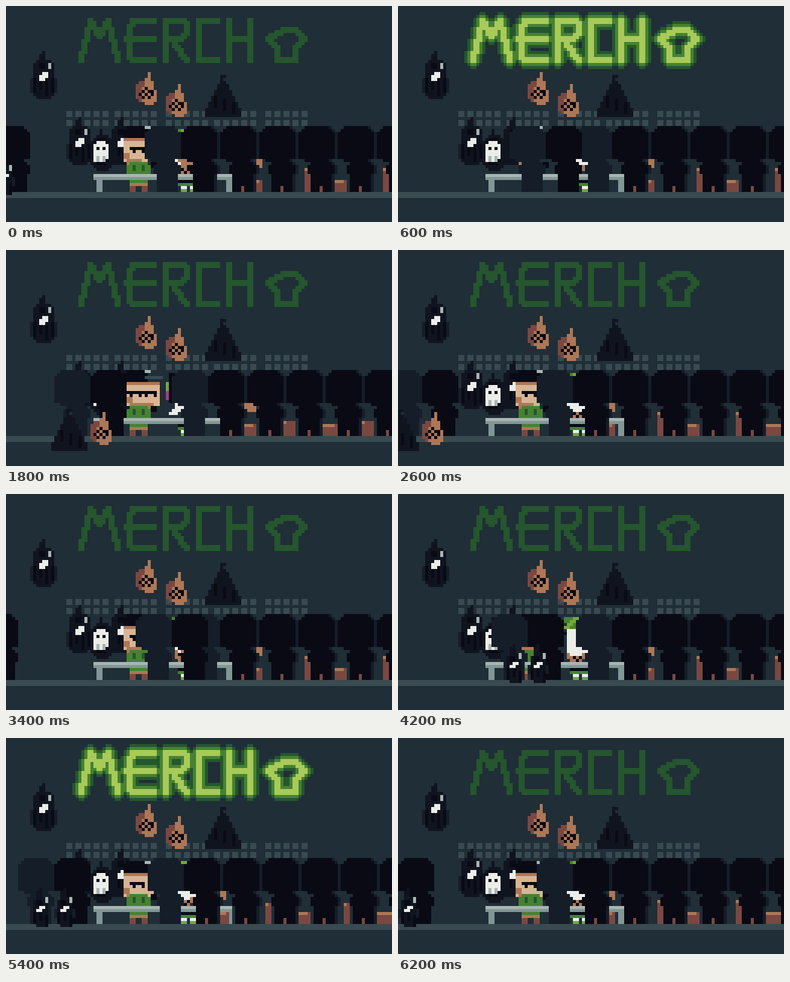
Write an HTML page with a canvas that moves like this. It is 640 px wide and 360 px high and loops after 6.4 s.

```html
<!DOCTYPE html>
<html>
<head>
<meta charset="utf-8">
<style>
html, body { margin: 0; width: 100%; height: 100%; overflow: hidden; background: #202e37; }
canvas { display: block; width: 640px; height: 360px; image-rendering: pixelated; }
</style>
</head>
<body>
<canvas id="stage" width="128" height="72"></canvas>
<script>
const ctx = document.getElementById('stage').getContext('2d');
const WALL = '#202e37', STEEL = '#394a50', SHADE = '#151d28', COAL = '#10141f', INK = '#090a14';
const WHITE = '#ebede9', SILVER = '#a8b5b2', GREY = '#819796', PINK = '#a23e8c';
const SKIN = '#d7b594', TAN = '#ad7757', BROWN = '#7a4841';
const MOSS = '#25562e', GREEN = '#468232', LEAF = '#75a743', LIME = '#a8ca58';
const STEP = 200, CYCLE = 3200, GAP = 13;

const mix = (a, b, k) => a + (b - a) * k;

function box(color, x, y, w, h) {
  ctx.fillStyle = color;
  ctx.fillRect(Math.round(x), Math.round(y), Math.round(w), Math.round(h));
}

// Stack of pixel rows; edges(i) gives the left and right end of row i.
function rows(color, y, n, edges) {
  for (let i = 0; i < n; i++) {
    const [a, b] = edges(i).map(Math.round);
    box(color, a, y + i, b - a, 1);
  }
}

// Rectangle with corners cut by r steps.
function slab(color, x, y, w, h, r) {
  rows(color, y, h, i => {
    const inset = Math.max(0, r - i, r - (h - 1 - i));
    return [x + inset, x + w - inset];
  });
}

function at(x, y, paint) {
  ctx.save();
  ctx.translate(x, y);
  paint();
  ctx.restore();
}

// Polyline of pixels, each handed to dot(x, y).
function trace(points, dot) {
  points.slice(1).forEach(([x1, y1], k) => {
    const [x0, y0] = points[k], n = Math.max(Math.abs(x1 - x0), Math.abs(y1 - y0));
    for (let i = 0; i <= n; i++)
      dot(Math.round(mix(x0, x1, i / n)), Math.round(mix(y0, y1, i / n)));
  });
}

function bird(w, h) {
  const mid = w >> 1, eye = Math.round(h * 0.45);
  box(COAL, mid, 0, 1, 2);
  box(COAL, mid - 1, 1, 2, 2);
  slab(SHADE, 0, h * 0.5 | 0, w, h * 0.45 | 0, 1);
  slab(COAL, 1, 3, w - 2, h - 3, 1);
  for (let x = 1; x < w - 1; x += 2) box(INK, x, h * 0.5 + x % 3, 1, h * 0.3);
  box(INK, mid - 1, 4, 2, 2);
  box(SILVER, mid + 2, h / 4, 1, 2);
  box(WHITE, mid, eye, 2, h >> 3);
  box(WHITE, mid - 1, eye + 1, 2, h >> 3);
}
const bigBird = () => bird(9, 16), smallBird = () => bird(7, 13);

function skullBird() {
  box(COAL, 3, 0, 1, 2);
  slab(COAL, 0, 2, 8, 12, 2);
  slab(INK, 1, 3, 5, 9, 1);
  slab(WHITE, 1, 4, 5, 7, 1);
  for (const x of [2, 4]) {
    box(INK, x, 6, 1, 1);
    box(WHITE, x - 1, 10, 1, 1);
    box(SILVER, x, 9, 1, 2);
  }
}

function ear() {
  slab(BROWN, 0, 3, 4, 7, 1);
  rows(TAN, 0, 11, i => [Math.max(2, 4 - i / 3) + (i > 9), Math.min(7, 4.6 + i / 3) - (i > 9)]);
  trace([[2, 8], [1, 7], [3, 5], [5, 6], [4, 8], [3, 7]], (x, y) => box(INK, x, y, 1, 1));
}

function cloak() {
  slab(COAL, 5, 0, 2, 3, 0);
  box(WALL, 6, 1, 1, 1);
  rows(COAL, 3, 11, i => {
    const half = Math.min(6, 2 + i * 0.45);
    return [6 - half, 6 + half];
  });
  for (let x = 3; x < 10; x += 3) box(INK, x, 10 - x % 4, 1, 4);
}

// Sign strokes, drawn with a square pen two pixels wide.
const strokes = [
  [[24, 17], [27, 4], [30, 9], [33, 4], [36, 17]],
  [[48, 4], [41, 4], [40, 6], [40, 16], [41, 17], [48, 17]], [[39, 10], [48, 10]],
  [[52, 17], [52, 4], [58, 4], [59, 6], [59, 8], [57, 10], [53, 10]], [[55, 12], [59, 17]],
  [[69, 4], [63, 4], [63, 17], [69, 17]],
  [[73, 4], [73, 17]], [[80, 4], [80, 17]], [[74, 10], [80, 10]],
  [[91, 7], [95, 7], [98, 10], [95, 13], [95, 17], [89, 17], [89, 13], [86, 10], [91, 7]]];

function neon(color, grow) {
  for (const s of strokes) trace(s, (x, y) => {
    for (let g = 0; g <= grow; g++) box(color, x - g, y - grow + g, 2 + 2 * g, 2 + 2 * (grow - g));
  });
}

function sign(t) {
  const level = [0, 0, 1, 2, 1, 0, 1, 0][t / STEP % 8];
  for (let g = level; g > 0; g--) neon(g < level ? GREEN : MOSS, g);
  neon([MOSS, GREEN, LIME][level], 0);
}

function shop() {
  box(WALL, 0, 0, 128, 72);
  box(STEEL, 0, 62, 128, 2);
  for (let i = 0; i < 50; i++) {
    const col = i >> 1, group = Math.floor(col / 5);
    box(STEEL, 20 + Math.floor(group * 16.5) + col % 5 * 3, 35 + i % 2 * 3, 2, 2);
  }
  at(8, 15, bigBird);
  at(43, 22, ear);
  at(53, 26, ear);
  at(66, 23, cloak);
  at(20, 37, bigBird);
  at(34, 37, bigBird);
  at(28, 41, skullBird);
}

function table() {
  box(SILVER, 29, 56, 46, 1);
  box(GREY, 29, 57, 46, 1);
  for (const x of [30, 73]) box(GREY, x, 58, 2, 4);
}

function head(x, y, w, lenses, nose) {
  slab(INK, 39, y - 4, 8, 5, 1);
  box(SILVER, 46, y - 4, 2, 1);
  box(TAN, x, y, w, 1);
  box(SKIN, x, y + 1, w, 7);
  box(TAN, x, y + 5, 2, 2);
  box(TAN, x + 1, y + 7, w - 3, 2);
  for (let i = 1; i <= lenses; i++) {
    const lens = x + w - 5 * i;
    box(INK, lens - 1, y + 3, 5, 1);
    box(INK, lens, y + 4, 4, 1);
    box(SKIN, lens + 1, y + 4, 2, 1);
  }
  box(SKIN, x + w - 1, y + 6, nose, 2);
}

function seller(t, c) {
  const second = t >= CYCLE;
  if (c >= 1400 && c < (second ? 2000 : 2400)) {
    head(40, 44, 11, 2, 1);
    box(STEEL, 46, 42, 6, 1);
  } else if (second && c >= 2000) head(39, 45, 8, 1, 4);
  else head(39, 44, 8, 1, 1);
  slab(GREEN, 40, 52, 8, 5, 1);
  for (const x of [42, 45]) box(MOSS, x, 53, 1, 2);
  box(INK, 48, 52, 2, 2);
  box(GREEN, 41, 58, 6, 1);
  box(TAN, 41, 59, 6, 1);
  for (const x of [41, 45]) box(BROWN, x, 60, 2, 2);
}

function gnome(c) {
  const reach = c >= 1400 && c < 2000, bare = c < 400;
  rows(GREEN, 41, 4, i => [55 + i / 4, 60 - i / 3]);
  trace([[58, 41], [55, 44]], (x, y) => box(LEAF, x, y, 2, 1));
  slab(WHITE, 56, 45, 3, 8, 0);
  box(INK, 55, 46, 1, 1);
  if (reach) {
    box(INK, 54, 41, 6, 10);
    box(LEAF, 53, 44, 1, 3);
    box(PINK, 53, 47, 1, 3);
    trace([[59, 52], [56, 54]], (x, y) => box(WHITE, x - 2, y, 3, 1));
  } else {
    slab(TAN, 56, 51, 6, 5, 1);
    trace([[57, 53], [59, 55], [60, 53]], (x, y) => box(INK, x, y, 1, 1));
    if (!bare) slab(WHITE, 56, 51, 6, 3, 1);
    box(WHITE, 57, 52, bare ? 1 : 6, 1);
  }
  slab(GREEN, 57, 57, 6, 3, 0);
  box(INK, 57, 58, 6, 1);
  for (const x of [58, 61]) {
    box(WHITE, x, 60, 2, 1);
    box(LEAF, x, 61, 2, 1);
  }
}

// Bags and hands between people; they slide into view while the line moves.
function luggage(x, n, slide) {
  const tall = n % 2, w = tall ? mix(2, 4, slide) : mix(3 + n, 6, slide);
  const h = 4 + tall * Math.round(4 * (1 - slide)), left = x + 11 + tall * 4 * (1 - slide);
  box(BROWN, left, 62 - h, w, h);
  box(TAN, left, 62 - h, tall ? 1 : w - 1, 1);
  if (n === 0) box(TAN, x + 12, 51, 2 + 2 * slide, 3);
}

function person(x, color) {
  slab(color, x, 40, 12, 12, 2);
  box(color, x, 42, 12, 9);
  slab(color, x + 3, 52, 9, 5, 1);
  box(color, x + 4, 56, 7, 6);
}

// Way of the served customer along the counter and out.
const path = [[0, 58], [1000, 43], [1800, 28], [2200, 16], [6400, -68]];
function along(time) {
  const i = path.findIndex(p => p[0] > time), [t0, x0] = path[i - 1], [t1, x1] = path[i];
  return Math.round(mix(x0, x1, (time - t0) / (t1 - t0)));
}

function carried(x, birds) {
  at(x - (birds ? 8 : 13), birds ? 50 : 53, birds ? smallBird : cloak);
  at(x, birds ? 50 : 54, birds ? smallBird : ear);
}

function frame(now) {
  const t = Math.floor(now % (2 * CYCLE) / STEP) * STEP, c = t % CYCLE, second = t >= CYCLE;
  const u = Math.min(1, Math.max(0, (c - 1440) / 950));
  const shift = Math.round(GAP * u * u * (3 - 2 * u)), slide = Math.sin(Math.PI * shift / GAP);
  const here = along(c), gone = along(c + CYCLE);
  const line = Array.from({ length: 6 }, (_, n) => 71 + GAP * n - shift);

  shop();
  sign(t);
  seller(t, c);
  gnome(c);
  table();
  line.forEach((x, n) => luggage(x, n, slide));

  const people = [gone, here, ...line];
  people.forEach(x => person(x - 12, SHADE));
  people.forEach(x => person(x, INK));
  line.forEach(x => box(BROWN, x + 7, 60, 1, 2));

  carried(gone, !second);
  if (c >= 800) carried(here, second);
}

function loop() {
  frame(performance.now());
  requestAnimationFrame(loop);
}
loop();
</script>
</body>
</html>
```
